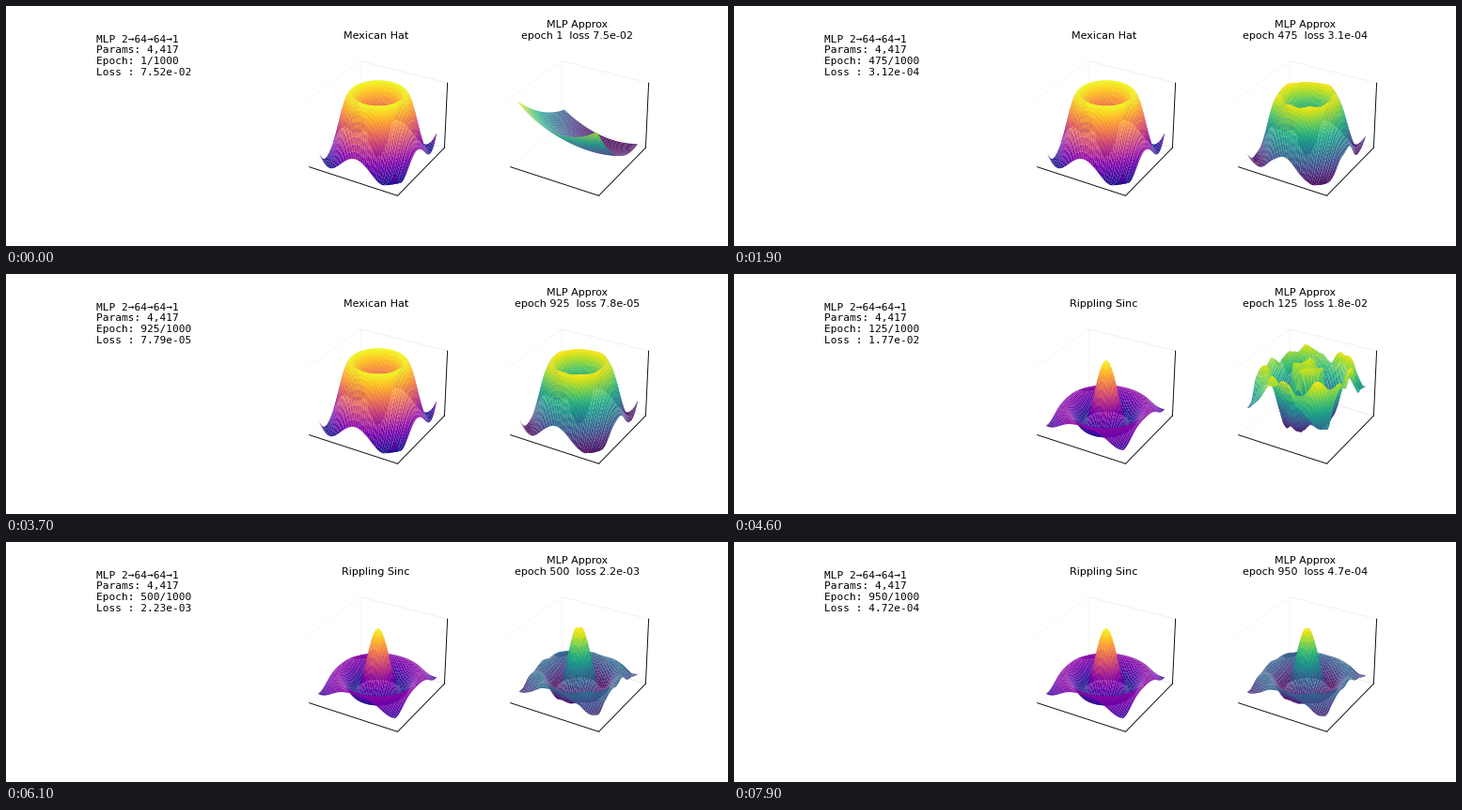
A matplotlib script that plays this animation: 768 by 256 pixels, repeating every 8 s.

```python
import numpy as np
import matplotlib.pyplot as plt
from matplotlib.animation import FuncAnimation

FRAMES, INTERVAL = 80, 100
PER_TASK = 41          # epochs 1, 25, 50 ... 1000
N = 50                 # grid points per side
TROUGH = 2 * np.pi

X, Y = np.meshgrid(np.linspace(-1, 1, N), np.linspace(-1, 1, N))
R = np.hypot(X, Y)


def unit(z):
    return (z - z.min()) / (z.max() - z.min())


HAT = unit(-np.cos(5.18 * R))
SINC = unit(np.sinc(8 * R / np.pi))

# Bumpy ridges with the kinks of a ReLU network
rng = np.random.default_rng(7)
ANGLE = rng.uniform(0, np.pi, 36)
FREQ = rng.uniform(1.5, 5.5, 36)
PHASE = rng.uniform(0, 2, 36)


def ridges(epoch):
    z = np.zeros_like(X)
    for a, f, p in zip(ANGLE, FREQ, PHASE):
        t = f * (X * np.cos(a) + Y * np.sin(a)) + p + 0.12 * np.log(epoch)
        z += abs(t % 2 - 1) - 0.5
    return z / z.std()


def bowl(u, v):
    """Smooth quadratic patch: the untrained network."""
    def basis(s):
        return s * (s - 1) / 2, 1 - s * s, s * (s + 1) / 2
    knots = ((1.0, 0.55, 0.3), (0.68, 0.2, 0.05), (0.88, 0.21, 0.08))
    return sum(k * bu * bv for row, bu in zip(knots, basis(u))
               for k, bv in zip(row, basis(v)))


def curve(epoch, points):
    xs, ys = zip(*points)
    return np.interp(epoch, xs, ys)


def log_curve(epoch, points):
    return np.exp(curve(epoch, [(x, np.log(y)) for x, y in points]))


def hat_fit(epoch, loss):
    w = curve(epoch, [(1, 0), (25, .15), (50, .4), (100, .75), (250, 1)])
    rise = curve(epoch, [(1, 0), (275, .45), (700, .95), (1000, 1)])
    fit = np.where(5.18 * R > TROUGH, HAT * rise, HAT)
    noise = min(np.sqrt(loss), 0.04) * w
    return (1 - w) * 0.4 * bowl(X, Y) + w * fit + noise * ridges(epoch)


def sinc_fit(epoch, loss):
    w = curve(epoch, [(1, 0), (25, .3), (75, .8), (125, 1)])
    cap = curve(epoch, [(1, .26), (125, .285), (250, .5), (375, .74),
                        (500, .92), (950, .98)])
    fit = np.minimum(SINC, cap)
    noise = (0.12 * np.sqrt(loss) + 0.009) * w
    return (1 - w) * 0.3 * bowl(-Y, X) + w * fit + noise * ridges(epoch)


TASKS = (
    ("Mexican Hat", HAT, hat_fit,
     [(1, 7.52e-2), (25, 5.1e-2), (50, 3.2e-2), (100, 1.1e-2), (175, 2.6e-3),
      (275, 7.21e-4), (700, 1.22e-4), (925, 7.79e-5), (1000, 7.1e-5)]),
    ("Rippling Sinc", SINC, sinc_fit,
     [(1, 4.6e-2), (25, 2.4e-2), (125, 1.77e-2), (300, 7.2e-3),
      (500, 2.23e-3), (950, 4.72e-4), (1000, 4.3e-4)]),
)

plt.rcParams["font.family"] = "DejaVu Sans"
fig = plt.figure(figsize=(9.6, 3.2), dpi=80)
grid = fig.add_gridspec(1, 3, wspace=0.28)

info_ax = fig.add_subplot(grid[0])
info_ax.axis("off")
info = info_ax.text(0, 1, "", va="top", fontsize=10, family="DejaVu Sans Mono",
                    transform=info_ax.transAxes)


def surface_axes(cell):
    ax = fig.add_subplot(cell, projection="3d")
    lim = 1.1 * 25 / 24
    ax.set(xlim=(-lim, lim), ylim=(-lim, lim), xticks=[], yticks=[], zticks=[])
    for axis in (ax.xaxis, ax.yaxis, ax.zaxis):
        axis.pane.set_fill(False)
    return ax


true_ax, fit_ax = surface_axes(grid[1]), surface_axes(grid[2])


def show(ax, z, cmap, title):
    for old in list(ax.collections):
        old.remove()
    ax.plot_surface(X, Y, z, cmap=cmap, linewidth=0, antialiased=True)
    lim = 1.1 * 25 / 24
    pad = np.ptp(z) / 48
    ax.set(xlim=(-lim, lim), ylim=(-lim, lim),
           zlim=(z.min() - pad, z.max() + pad))
    ax.set_title(title, fontsize=10, pad=10)


def update(i):
    task, step = divmod(i, PER_TASK)
    name, target, fit, losses = TASKS[task]
    epoch = max(1, 25 * step)
    loss = log_curve(epoch, losses)
    info.set_text(f"MLP 2→64→64→1\nParams: 4,417\n"
                  f"Epoch: {epoch}/1000\nLoss : {loss:.2e}")
    if step == 0 or not true_ax.collections:
        show(true_ax, target, "plasma", name)
    show(fit_ax, fit(epoch, loss), "viridis",
         f"MLP Approx\nepoch {epoch}  loss {loss:.1e}")


anim = FuncAnimation(fig, update, frames=FRAMES, interval=INTERVAL,
                     init_func=lambda: None, repeat=True, repeat_delay=0)
plt.show()
```
